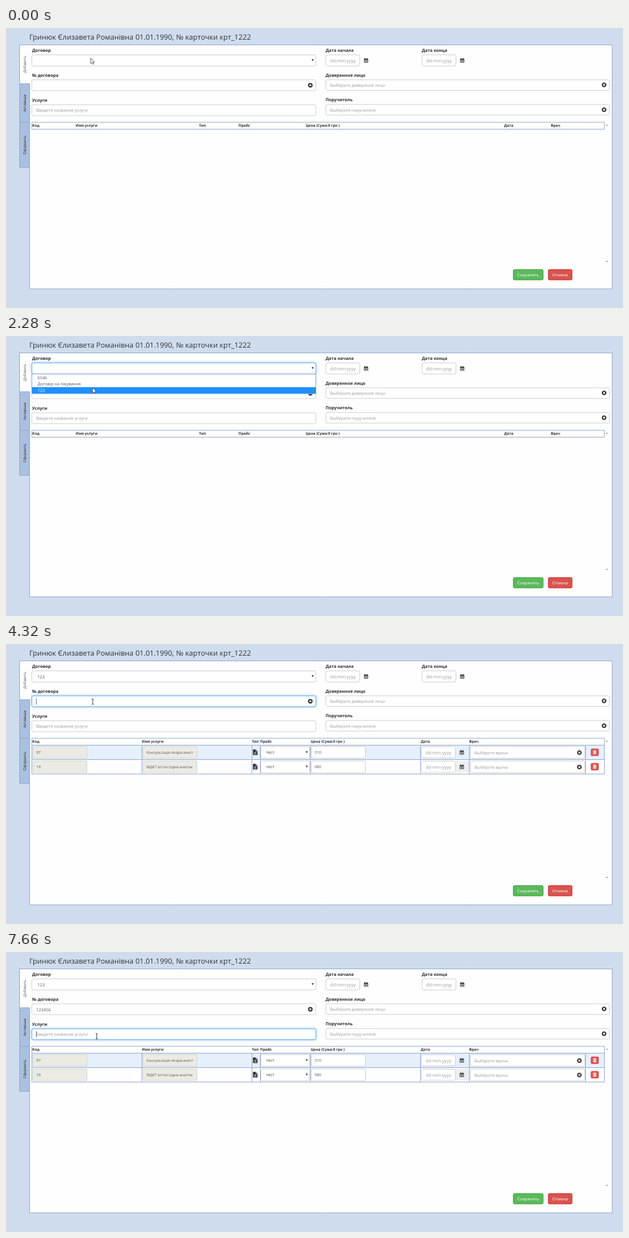
An HTML page with a canvas that plays this animation: 1110 by 505 pixels, repeating every 8 s.

```html
<!DOCTYPE html>
<html lang="ru">
<head>
<meta charset="utf-8">
<title>Форма договора</title>
<style>
html, body { margin: 0; width: 100%; height: 100%; overflow: hidden; background: #cfdced; }
canvas { display: block; width: 1110px; height: 505px; }
</style>
</head>
<body>
<canvas id="stage"></canvas>
<script>
const W = 1110, H = 505, LOOP = 8000;
const FONT = '"Open Sans", "Noto Sans", sans-serif';
const LINE = '#8aa5cb', DARK = '#333', GRAY = '#999', RED = '#d9534f', FOCUS = '#66afe9';
const canvas = document.getElementById('stage');
const ctx = canvas.getContext('2d');
const dpr = window.devicePixelRatio || 1;
canvas.width = W * dpr;
canvas.height = H * dpr;

// Pointer stops: time, x, y, kind
const pointer = [
  [0, 152.5, 54.5, 'arrow'], [1610, 154.5, 72, 'arrow'], [1740, 155.5, 84.5, 'arrow'],
  [1880, 155.5, 90, 'arrow'], [2140, 155.5, 92.5, 'arrow'], [2280, 155.8, 93.2, 'arrow'],
  [2680, 157, 94.8, 'beam'], [2820, 156.5, 99, 'beam'], [2950, 156, 104, 'beam'],
  [6370, 160.5, 144, 'beam'], [6510, 162.5, 150, 'beam'], [6640, 163.2, 152, 'beam']
];
const hover = [[0, -1], [1610, 0], [1740, 1], [2280, 2]];
const typed = [[0, 0], [4450, 1], [4720, 2], [4880, 3], [5150, 4], [5280, 5], [5560, 6]];
const caret = [[0, 0], [3220, 1], [3760, 0], [4320, 1], [6100, 0], [6640, 1], [7060, 0], [7660, 1]];
const focus = {
  contract: [[0, 0], [1340, 1], [3220, 0.5], [3340, 0]],
  number: [[0, 0], [3220, 0.5], [3340, 1], [7660, 0]],
  service: [[0, 0], [7500, 0.25], [7660, 1]]
};

function at(steps, t) {
  let now = steps[0];
  for (const s of steps) if (s[0] <= t) now = s;
  return now;
}

function text(str, x, y, size = 7.65, color = DARK, weight = 400) {
  ctx.font = `${weight} ${size}px ${FONT}`;
  ctx.fillStyle = color;
  ctx.fillText(str, x, y);
}

function bold(str, x, y, size = 7.7) {
  text(str, x, y, size, '#2b2b2b', 700);
}

function rect(x, y, w, h, fill, stroke, r = 0, lw = 1) {
  ctx.beginPath();
  ctx.roundRect(x, y, w, h, r);
  if (fill) { ctx.fillStyle = fill; ctx.fill(); }
  if (stroke) { ctx.strokeStyle = stroke; ctx.lineWidth = lw; ctx.stroke(); }
}

function line(points, color, lw = 1) {
  ctx.beginPath();
  points.forEach(([x, y], i) => i ? ctx.lineTo(x, y) : ctx.moveTo(x, y));
  ctx.strokeStyle = color;
  ctx.lineWidth = lw;
  ctx.stroke();
}

function shape(points, fill) {
  ctx.beginPath();
  points.forEach(([x, y]) => ctx.lineTo(x, y));
  ctx.closePath();
  ctx.fillStyle = fill;
  ctx.fill();
}

function field(x, y, w, h, glow = 0) {
  rect(x, y, w, h, '#fff', '#ccc', 2.5);
  if (!glow) return;
  ctx.save();
  ctx.globalAlpha = glow;
  if (glow >= 0.5) {
    ctx.shadowColor = 'rgba(102,175,233,.6)';
    ctx.shadowBlur = 5 * dpr;
  }
  rect(x, y, w, h, '#fff', FOCUS, 2.5);
  ctx.restore();
}

function dropArrow(x, y) {
  shape([[x - 2, y - 1.8], [x + 2, y - 1.8], [x, y + 1.8]], '#333');
}

function clearIcon(x, y) {
  ctx.beginPath();
  ctx.arc(x, y, 4.2, 0, 7);
  ctx.fillStyle = DARK;
  ctx.fill();
  line([[x - 1.6, y - 1.6], [x + 1.6, y + 1.6]], '#fff', 1.3);
  line([[x + 1.6, y - 1.6], [x - 1.6, y + 1.6]], '#fff', 1.3);
}

function calendar(x, y) {
  rect(x - 3.8, y - 3, 7.6, 7, DARK, null, 0.6);
  rect(x - 2.5, y - 4.2, 1.3, 2, DARK);
  rect(x + 1.2, y - 4.2, 1.3, 2, DARK);
  for (let i = 0; i < 12; i++)
    rect(x - 3.1 + (i % 4) * 1.65, y - 0.9 + Math.floor(i / 4) * 1.55, 1.15, 1.05, '#fff');
}

function docIcon(x, y) {
  shape([[x - 4, y - 5], [x + 1, y - 5], [x + 4, y - 2], [x + 4, y + 5], [x - 4, y + 5]], '#222');
  line([[x + 1, y - 5], [x + 1, y - 1.9], [x + 4, y - 1.9]], '#fff', 0.7);
  for (const d of [0, 1.6, 3.2]) line([[x - 2.3, y + d], [x + 2.3, y + d]], '#fff', 0.7);
}

function trash(x, y) {
  rect(x - 6.8, y - 6.3, 13.6, 12.6, RED, '#d43f3a', 2, 0.7);
  rect(x - 2.6, y - 1.8, 5.2, 5.3, '#fff', null, 0.6);
  line([[x - 3.3, y - 2.5], [x + 3.3, y - 2.5]], '#fff', 0.9);
  line([[x - 1.2, y - 2.7], [x - 0.8, y - 3.6], [x + 0.8, y - 3.6], [x + 1.2, y - 2.7]], '#fff', 0.7);
  for (const d of [-1.2, 0, 1.2]) line([[x + d, y - 0.9], [x + d, y + 2.6]], RED, 0.5);
}

function dateField(x, y) {
  field(x, y, 61, 20);
  text('dd-mm-yyyy', x + 7.5, y + 13.2, 8, GRAY);
}

function tab(label, y, h, fill, color) {
  rect(24.5, y, 18, h, fill, LINE);
  ctx.save();
  ctx.translate(35.5, y + h / 2);
  ctx.rotate(-Math.PI / 2);
  ctx.textAlign = 'center';
  text(label, 0, 0, 6.6, color);
  ctx.restore();
}

function button(label, x, w, fill, edge) {
  rect(x + 0.5, 435.5, w - 1, 19, fill, edge, 2.5);
  text(label, x + 7.8, 447.9, 7.5, '#fff');
}

function frame() {
  rect(0, 0, W, H, '#cfdced');
  text('Гринюк Єлизавета Романівна', 42, 21, 13);
  text('01.01.1990,', 233, 21, 12.9);
  text('№ карточки крт_1222', 306, 21, 13);
  rect(42.5, 30.5, 1048, 440, '#fefefe', LINE);
  tab('Добавить', 30.5, 70, '#fefefe', '#555');
  tab('Активные', 100.5, 70, '#abc0dd', '#222');
  tab('Оформить', 170.5, 81, '#abc0dd', '#222');
  line([[42.5, 31], [42.5, 100]], '#fefefe', 1.4);
  button('Сохранить', 912, 55, '#5cb85c', '#4cae4c');
  button('Отмена', 975, 44, RED, '#d43f3a');
  shape([[1079, 176.3], [1083, 176.3], [1081, 174]], '#888');
  shape([[1079, 420], [1083, 420], [1081, 422.3]], '#888');
}

function form(t) {
  bold('Договор', 47, 43.3);
  bold('№ договора', 47, 88.2);
  bold('Услуги', 47, 132.8);
  bold('Дата начала', 575, 43.3);
  bold('Дата конца', 748, 43.3);
  bold('Доверенное лицо', 575, 87.8);
  bold('Поручитель', 575, 132.4);

  field(46.5, 48.5, 511, 20, at(focus.contract, t)[1]);
  dropArrow(551.7, 58);
  field(46.5, 93.5, 511, 19.5, at(focus.number, t)[1]);
  clearIcon(547.5, 103.2);
  field(46.5, 138.5, 511, 19.5, at(focus.service, t)[1]);
  text('Введите название услуги', 54, 151.4, 7.6, GRAY);

  for (const x of [575.5, 748.5]) {
    dateField(x, 48.5);
    calendar(x + 72.2, 58.4);
  }
  field(575.5, 93.5, 510, 19, 0);
  text('Выберите довереное лицо', 583, 106.2, 7.6, GRAY);
  clearIcon(1076, 102.6);
  field(575.5, 138, 510, 19, 0);
  text('Выберите поручителя', 583, 150.9, 7.6, GRAY);
  clearIcon(1076, 147.4);

  if (t >= 2430) text('123', 56.5, 61.6, 7.65, '#555');
  const value = '123456'.slice(0, at(typed, t)[1]);
  text(value, 54.3, 106.5, 7.65, '#555');
  if (at(caret, t)[1]) {
    const late = t >= 7660;
    const x = late ? 54.5 : Math.round(54 + ctx.measureText(value).width) + 0.5;
    const y = late ? 143 : 98;
    line([[x, y], [x, y + 11]], '#444', 0.8);
  }
}

function row(y, code, name, price, first) {
  rect(46.5, y, 1030, 26, first ? '#e6f0fc' : '#fefefe', LINE);
  for (const x of [244.5, 442.5, 457.5, 547.5, 745.5, 833.5, 1042.5])
    line([[x, y], [x, y + 26]], LINE);
  const top = y + 2.5, base = y + 15.4;
  rect(48.5, top, 97, 21, '#ebebe4', '#d2d2cd');
  text(code, 54.5, base, 6.9, '#555');
  rect(246.5, top, 97, 21, '#ebebe4', '#d2d2cd');
  text(name, 252.8, base, 6.6, '#555');
  docIcon(448.4, y + 12.8);
  field(458.5, top, 88, 21);
  text('тест', 468, base + 0.4, 7.6, '#444');
  dropArrow(541, y + 12.8);
  rect(549.5, top, 97, 21, '#fff', '#ccc');
  text(price, 555, base, 7, '#555');
  if (!first) rect(809, y + 2.5, 24, 20.5, '#eee');
  dateField(747.5, y + 2.8);
  calendar(820, y + 13);
  field(835.5, top, 206, 21);
  text('Выберите врача', 842.8, base + 0.6, 7.5, GRAY);
  clearIcon(1031.5, y + 13.4);
  trash(1059.2, y + 12.8);
}

function table(t) {
  const loaded = t >= 2550;
  const cols = loaded ? [47, 244, 442, 457, 548, 746, 833] : [47, 125, 347, 418, 539, 896, 980];
  rect(46.5, 170, 1030, 12.5, '#fefefe', LINE);
  ['Код', 'Имя услуги', 'Тип', 'Прайс', 'Цена (Сума:0 грн )', 'Дата', 'Врач']
    .forEach((s, i) => bold(s, cols[i] + 0.3, 178, 6.5));
  if (!loaded) return;
  row(182.5, '97', 'Консультація лікаря-анест', '310', true);
  row(208.5, '19', 'МДКТ кісток (одна анатом', '980', false);
}

function list(t) {
  if (t < 1340 || t >= 2430) return;
  rect(46.5, 68.5, 511, 35.5, '#fff', '#6f9bd3');
  const active = at(hover, t)[1];
  ['6546', 'Договір на лікування', '123'].forEach((s, i) => {
    const y = 69 + i * 11.6;
    if (i === active) rect(47, y, 510, 11.6, '#1e90ff');
    text(s, 56.7, y + 8.8, 7.6, i === active ? '#fff' : '#555');
  });
}

function drawPointer(t) {
  const [, x, y, kind] = at(pointer, t);
  if (kind === 'beam') {
    line([[x, y - 4.5], [x, y + 4.5]], '#333', 1);
    for (const d of [-4.6, 4.6]) line([[x - 1.9, y + d], [x + 1.9, y + d]], '#333', 0.9);
    return;
  }
  const tip = [[0, 0], [0, 9.7], [2.2, 7.7], [3.8, 11], [5.3, 10.3], [3.8, 7.1], [6.7, 7]]
    .map(([a, b]) => [x + a, y + b]);
  shape(tip, '#fff');
  line([...tip, tip[0]], '#333', 0.8);
}

function draw(t) {
  ctx.setTransform(dpr, 0, 0, dpr, 0, 0);
  ctx.textRendering = 'geometricPrecision';
  frame();
  form(t);
  table(t);
  list(t);
  drawPointer(t);
}

const start = performance.now();
function tick() {
  draw((performance.now() - start) % LOOP);
  requestAnimationFrame(tick);
}
tick();
</script>
</body>
</html>
```
